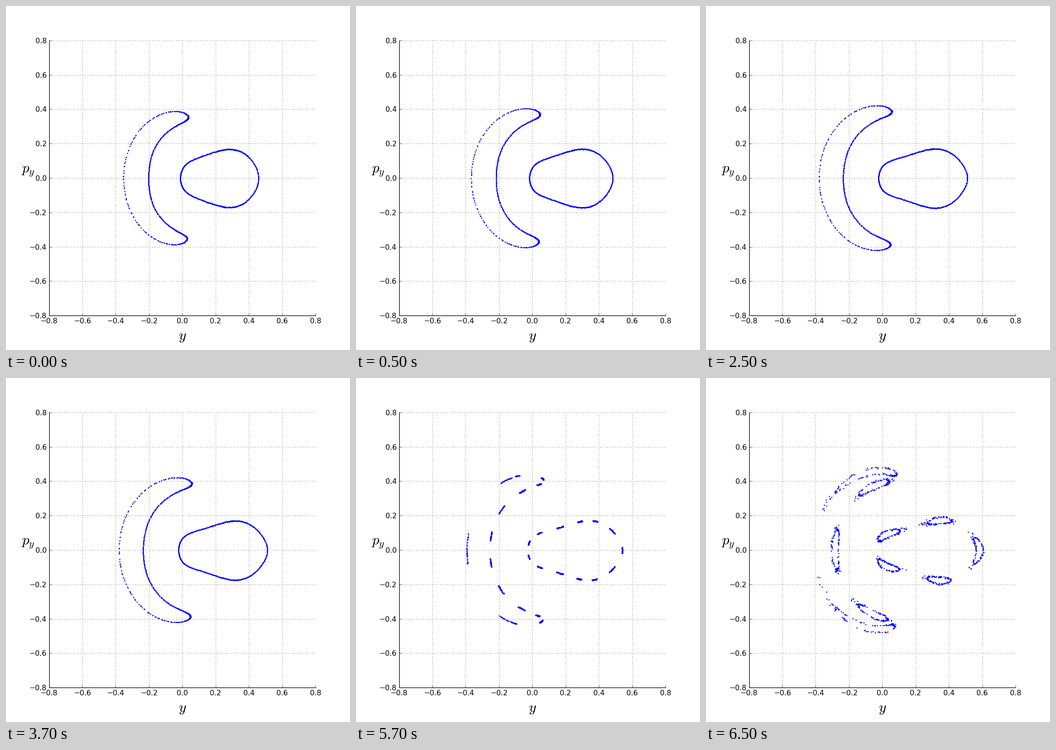
These frames come from a looping animation (748 by 748 pixels, 8000 ms). A matplotlib script:

```python
import numpy as np
import matplotlib.pyplot as plt
from matplotlib.animation import FuncAnimation

SIZE, DPI = 748, 93.5
STEP_MS = 500
MID = SIZE / 2
ORIGIN_X, UNIT_X = 383.35, 362.3   # stage x of y = 0, pixels per unit of y
POINTS = 560                       # crossings drawn per curve
LATENESS = .02                     # longest delay in noticing a crossing
plt.rcParams.update({
    "font.family": "DejaVu Sans", "font.size": 12, "mathtext.fontset": "cm",
    "lines.scale_dashes": False, "axes.axisbelow": False,
})


def series(wave, angle, coefficients):
    """Sum of coefficient * wave(k * angle) for k = 1, 2, ..."""
    return sum(c * wave(k * angle) for k, c in enumerate(coefficients, 1))


# Both curves take the orbit's phase and an energy level, and give complex
# stage positions: x + i * height above the p_y = 0 line.
def oval(phase, level):
    theta = phase + series(np.sin, phase, (.07, .105, .07))
    left, right = 379 - 1.9 * level, 549 + 8.9 * level + .4 * level ** 2
    x = (left + right) / 2 + (right - left) / 2 * np.cos(theta)
    return x + 1j * series(np.sin, theta, (61, 5.3, .9, -2.5 - .65 * level))


def crescent(phase, level):
    psi = phase + series(np.sin, phase, (.4, .134, .045))
    bend = np.radians(95 + 1.3 * level) * np.sin(psi)
    radius = 120.2 + 5.5 * level + .2 * level ** 2
    radius = radius + series(np.cos, psi, (29 - .25 * level ** 2,
                                           -15.8 - .5 * level, -1.7, -3.8))
    return ORIGIN_X - radius * np.exp(-1j * bend)


def spread_evenly(curve, level, rng, start):
    steps = np.arange(POINTS) + rng.uniform(-.8, .8, POINTS)
    return curve(2 * np.pi * steps / POINTS, level)


def resonance(curve, level, rng, start, order=13, width=.075):
    """Short arcs at equally spaced phases."""
    centre = 2 * np.pi / order * (np.arange(POINTS) % order)
    phase = centre + rng.uniform(-width, width, POINTS)
    blur = rng.normal(0, .4, (2, POINTS))
    return curve(phase, level) + blur[0] + 1j * blur[1]


def islands(curve, level, rng, start, order=5, width=.33, thickness=7.5):
    """Thin loops at equally spaced phases, with a few strays past their ends."""
    centre = start + 2 * np.pi / order * (np.arange(POINTS) % order)
    turn = rng.uniform(0, 2 * np.pi, POINTS)
    reach = 1 + .6 * rng.random(POINTS) ** 8
    phase = centre + width * reach * np.cos(turn)
    z = curve(phase, level)
    tangent = curve(phase + 1e-4, level) - z
    blur = rng.normal(0, .8, (2, POINTS))
    return (z + 1j * tangent / abs(tangent) * thickness * np.sin(turn)
            + blur[0] + 1j * blur[1])


def section(pattern, level, rng):
    """Points (y, p_y), each caught slightly after the true crossing."""
    z = np.append(pattern(oval, level, rng, 0), pattern(crescent, level, rng, np.pi))
    y, p = (z.real - ORIGIN_X) / UNIT_X, z.imag / MID
    late = rng.uniform(0, LATENESS, len(z))
    return y + p * late, p - (y - y * y) * late


rng = np.random.default_rng(7)
sections = [section(spread_evenly, level, rng) for level in range(3)]
sections += [section(resonance, 3, rng), section(islands, 4.3, rng)]
schedule = [(frame + 3) // 4 for frame in range(16)]

fig = plt.figure(figsize=(SIZE / DPI, SIZE / DPI), dpi=DPI, facecolor="white")
ax = fig.add_axes([.125, .1, .775, .8])
ticks = np.linspace(-.8, .8, 9).round(1)
ax.set(xlim=(-.8, .8), ylim=(-.8, .8), xticks=ticks, yticks=ticks)
ax.spines[["top", "right"]].set_visible(False)
ax.spines[["left", "bottom"]].set_linewidth(1)
ax.tick_params(direction="in", length=4, width=.5, pad=4)
ax.grid(color="black", linewidth=.5, linestyle=(0, (1, 3)))
fig.text(384 / SIZE, 1 - 726 / SIZE, "$y$", size=24, ha="center", va="baseline")
fig.text(48 / SIZE, .5, "$p_y$", size=24, ha="center", va="bottom")
dots, = ax.plot([], [], "o", color="blue", markersize=2, markeredgewidth=0)


def update(frame):
    dots.set_data(*sections[schedule[frame]])
    return dots,


anim = FuncAnimation(fig, update, frames=len(schedule), interval=STEP_MS,
                     repeat=True, repeat_delay=0)
plt.show()
```
